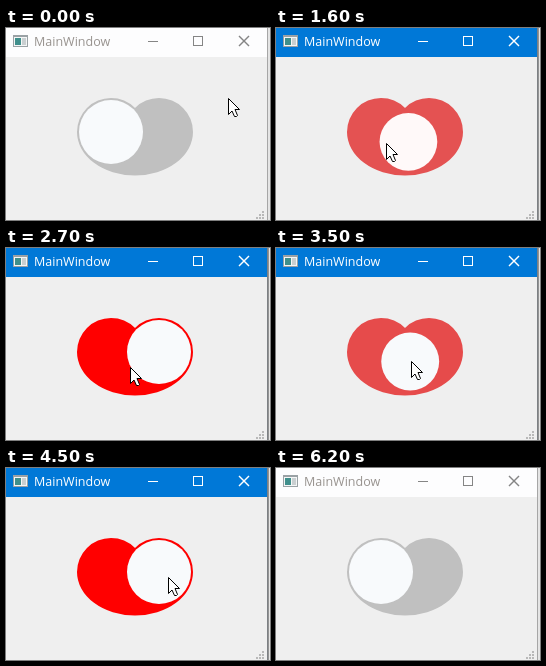
Animation of 264x192 px, one loop 6300 ms. Source, as an HTML page with a canvas:

```html
<!DOCTYPE html>
<html lang="en">
<head>
<meta charset="utf-8">
<title>Heart switch</title>
<style>
html, body { margin: 0; width: 100%; height: 100%; overflow: hidden; background: #efefef; }
canvas { display: block; width: 264px; height: 192px; }
</style>
</head>
<body>
<canvas id="stage"></canvas>
<script>
const W = 264, H = 192, LOOP = 6300, STEP = 100;
const SLIDE = 350, TRAVEL = 500, POINTER_GONE = 5900;
const canvas = document.getElementById('stage');
const ctx = canvas.getContext('2d');
const ratio = window.devicePixelRatio || 1;
canvas.width = W * ratio;
canvas.height = H * ratio;
ctx.scale(ratio, ratio);

// Start times of the slides; they alternate on, off, on, ...
const toggles = [450, 1450, 2250, 3363, 3970, 5139];

// Where the pointer comes to rest, and when
const rests = [
  { at: 0, x: 222, y: 70 },
  { at: 200, x: 110, y: 115 },
  { at: 2200, x: 107, y: 119 },
  { at: 3000, x: 150, y: 119 },
  { at: 3500, x: 135, y: 113 },
  { at: 4500, x: 162, y: 109 },
  { at: 5300, x: 131, y: 106 },
  { at: 5700, x: 128, y: 106 },
  { at: 5800, x: 190, y: 74 }
];

const clamp = v => Math.min(1, Math.max(0, v));
const mix = (a, b, p) => a + (b - a) * p;

function rect(x, y, w, h, color) {
  ctx.fillStyle = color;
  ctx.fillRect(x, y, w, h);
}

function line(x1, y1, x2, y2, width) {
  ctx.lineWidth = width;
  ctx.beginPath();
  ctx.moveTo(x1, y1);
  ctx.lineTo(x2, y2);
  ctx.stroke();
}

function progress(t) {
  let p = 0;
  toggles.forEach((start, i) => {
    if (t < start) return;
    const k = clamp((t - start) / SLIDE);
    p = i % 2 ? 1 - k : k;
  });
  return p;
}

function pointerAt(t) {
  let { x, y } = rests[0];
  for (let i = 1; i < rests.length; i++) {
    const next = rests[i];
    const start = Math.max(rests[i - 1].at, next.at - TRAVEL);
    const k = clamp((t - start) / (next.at - start));
    x = mix(x, next.x, k);
    y = mix(y, next.y, k);
  }
  return [Math.round(x), Math.round(y)];
}

function drawIcon() {
  rect(7, 7, 15, 12, '#9aa1a5');
  rect(8, 9, 13, 9, '#f4f6f6');
  rect(9, 10, 6, 7, '#3f8f8c');
  rect(16, 10, 4, 7, '#c9cfd1');
}

function drawButtons(color) {
  ctx.strokeStyle = color;
  line(142, 13.5, 152, 13.5, 1);
  ctx.strokeRect(187.5, 8.5, 9, 9);
  line(233, 8, 243, 18, 1.4);
  line(243, 8, 233, 18, 1.4);
}

function drawWindow(active) {
  rect(0, 0, W, H, '#efefef');
  rect(0, 0, 261, 29, active ? '#0078d7' : '#fdfdfe');
  rect(261, 0, 1, H, active ? '#7c8084' : '#a6a6a6');
  rect(262, 0, 1, H, active ? '#949494' : '#e4e4e4');
  rect(263, 0, 1, H, '#e4e4e4');
  drawIcon();

  ctx.fillStyle = active ? '#ffffff' : '#98938f';
  ctx.font = '12.5px "Open Sans", "Noto Sans", sans-serif';
  ctx.fillText('MainWindow', 28, 18);
  drawButtons(active ? '#ffffff' : '#858585');

  for (let row = 0; row < 3; row++)
    for (let col = 0; col <= row; col++)
      rect(256 - col * 3, 183 + row * 3, 2, 2, '#b8b8b8');
}

function drawSwitch(p, knobColor) {
  const g = Math.round(mix(192, 0, p));
  ctx.fillStyle = `rgb(${Math.round(mix(192, 255, p))},${g},${g})`;
  ctx.beginPath();
  ctx.arc(105, 104, 34, Math.PI, -Math.PI / 4);
  ctx.arc(153, 104, 34, -Math.PI * 3 / 4, 0);
  ctx.ellipse(129, 104, 58, 43.5, 0, 0, Math.PI);
  ctx.fill();

  // The knob dips and shrinks halfway across.
  const dip = 4 * p * (1 - p);
  ctx.fillStyle = knobColor;
  ctx.beginPath();
  ctx.arc(mix(105, 153, p), 104 + 10 * dip, 32 - 3.2 * dip, 0, Math.PI * 2);
  ctx.fill();
}

function drawPointer(x, y) {
  ctx.save();
  ctx.translate(x + 0.5, y + 0.5);
  ctx.fillStyle = '#ffffff';
  ctx.strokeStyle = '#000000';
  ctx.lineWidth = 1;
  const arrow = new Path2D('M0 0V16L3.5 12.5L6 18H8L9 17L6.5 11H11Z');
  ctx.fill(arrow);
  ctx.stroke(arrow);
  ctx.restore();
}

function render(now) {
  const t = Math.floor((now % LOOP) / STEP) * STEP;
  const warm = (t >= 500 && t < 1300) || (t >= 1500 && t < 2300);
  drawWindow(t >= 500 && t < 6200);
  drawSwitch(progress(t), warm ? '#fff9f9' : '#f8fafc');
  if (t < POINTER_GONE) drawPointer(...pointerAt(t));
}

let begin = null;
function tick(now) {
  if (begin === null) begin = now;
  render(now - begin);
  requestAnimationFrame(tick);
}
render(0);
requestAnimationFrame(tick);
</script>
</body>
</html>
```
